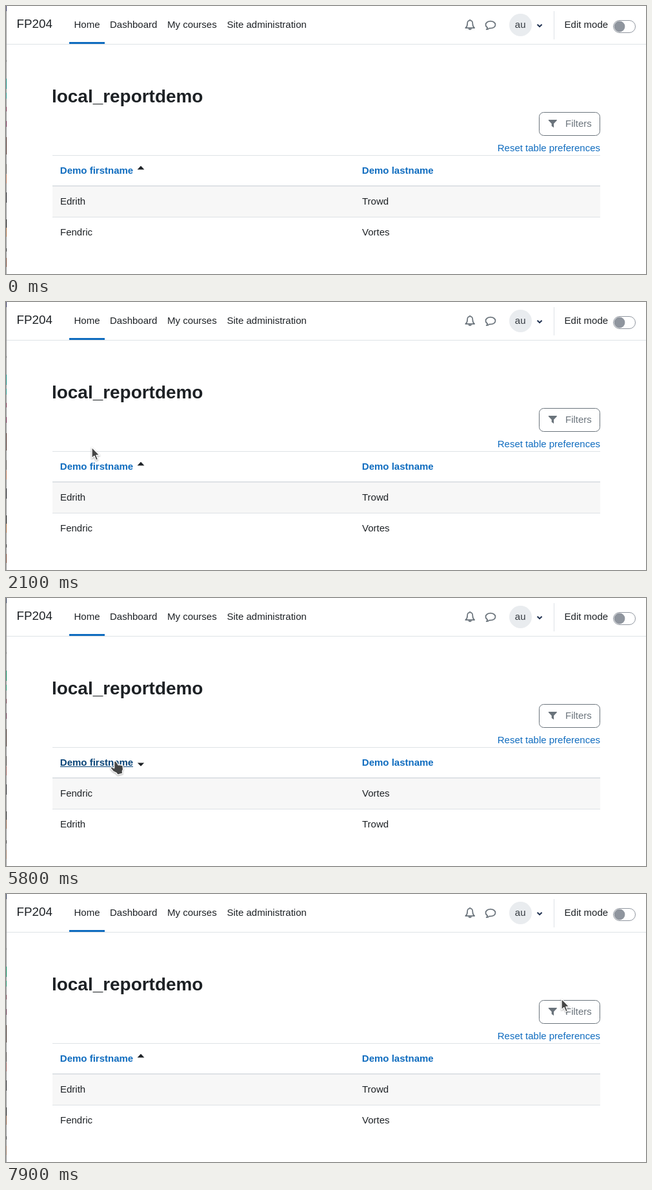
Recreate the animation shown at these times as an HTML page. Size 992 px wide and 417 px high, loop 8 s.

```html
<!DOCTYPE html>
<html lang="en">
<head>
<meta charset="utf-8">
<title>Report table</title>
<style>
  html, body { margin: 0; width: 100%; height: 100%; overflow: hidden; background: #fff; }
  svg { display: block; width: 992px; height: 417px; }
  text { font: 15px "Liberation Sans", Arial, sans-serif; fill: #1d2125; white-space: pre; }
  .brand { font-size: 18.75px; }
  .title { font-size: 27.95px; font-weight: 700; }
  .bold { font-weight: 700; }
  .link { fill: #0f6cbf; }
  .hover .link { fill: #094478; }
  .hover .rule { visibility: visible; }
  .rule { visibility: hidden; fill: #094478; }
  .muted { fill: #6a737b; }
  .line { fill: #dee2e6; }
  .icon { fill: none; stroke: #6a737b; stroke-width: 1.7; stroke-linejoin: round; }
  .pointer { fill: #454545; stroke: #fff; stroke-width: 1.3; stroke-linejoin: round;
    filter: drop-shadow(0 1px 1px rgba(0, 0, 0, .35)); }
</style>
</head>
<body>
<svg viewBox="0 0 992 417">
  <g id="edge"></g>

  <!-- navigation bar -->
  <text class="brand" x="16.6" y="34">FP204</text>
  <text x="105.5" y="34">Home</text>
  <text x="161" y="34">Dashboard</text>
  <text x="250" y="34">My courses</text>
  <text x="342.5" y="34">Site administration</text>
  <rect class="line" x="1" y="59" width="991" height="1"/>
  <rect x="98" y="56" width="55" height="3" fill="#0f6cbf"/>
  <path class="icon" d="M712.3 34.2c2-1.8 2.8-3.6 2.8-6.8 0-3 1.7-4.9 4.1-4.9s4.1 1.9 4.1 4.9c0 3.2.8 5 2.8 6.8zM719.2 22.3v-1.6M717.4 35c.3 2 3.3 2 3.6 0"/>
  <path class="icon" d="M751 23.7c-4.3 0-7.5 2.4-7.5 5.5 0 1.9 1.1 3.5 2.9 4.5-.2 1.2-.8 2-1.7 2.8 2 0 3.5-.8 4.6-2q.9.2 1.7.2c4.3 0 7.5-2.4 7.5-5.5s-3.2-5.5-7.5-5.5z"/>
  <circle cx="797.5" cy="29.5" r="17.5" fill="#e9ecef"/>
  <text x="797.2" y="34" text-anchor="middle" style="fill:#343a40">au</text>
  <path d="M823.6 28.7l3.5 3.4 3.5-3.4" fill="none" stroke="#1d2f4f" stroke-width="2"/>
  <rect class="line" x="849" y="8" width="1" height="44"/>
  <text x="865.6" y="34">Edit mode</text>
  <rect x="941.5" y="22.5" width="34" height="19" rx="9.5" fill="#fff" stroke="#8f959e"/>
  <circle cx="951" cy="32" r="8.4" fill="#8f959e"/>

  <!-- heading and controls -->
  <text class="title" x="71" y="150">local_reportdemo</text>
  <rect x="826.5" y="165.5" width="94" height="36" rx="7" fill="#fff" stroke="#6a737b"/>
  <path d="M841.2 177h12.3q.8.6.2 1.3l-4.6 4.8v6.1l-3.4-2.4v-3.7l-4.7-4.8q-.5-.8.2-1.3z" fill="#6a737b"/>
  <text class="muted" x="867" y="188">Filters</text>
  <text class="link" x="921" y="226" text-anchor="end">Reset table preferences</text>

  <!-- table -->
  <rect class="line" x="72" y="232" width="849" height="1"/>
  <rect class="line" x="72" y="279" width="849" height="2"/>
  <rect x="72" y="281" width="849" height="47" fill="#f7f7f7"/>
  <rect class="line" x="72" y="328" width="849" height="1"/>
  <g id="sort">
    <text class="link bold" x="83.8" y="261">Demo firstname</text>
    <rect class="rule" x="84" y="262" width="113" height="1"/>
  </g>
  <rect id="focus" x="83.5" y="245.5" width="113" height="20" fill="none" stroke="#094478" stroke-dasharray="1 1"/>
  <path id="caret" fill="#1d2125"/>
  <text class="link bold" x="551.8" y="261">Demo lastname</text>
  <g id="rows"></g>

  <path id="arrow" class="pointer" d="M0 0V17.2L3.9 13.6 6.7 20.2 9.6 19 6.9 12.5H12.2z"/>
  <path id="hand" class="pointer" d="M-1.8 .2c1-.8 2.3-.4 2.9.6L4.2 6c.8-.8 1.8-.8 2.5 0 .8-.6 1.9-.5 2.4.4 1-.4 1.8 0 2 1l.5 5.3-1.3 2.5.6 3.6-7.9 2.4-1.8-2.9-5.4-2.8-3.6-4.5c-.5-1.4.8-2.4 2.1-1.8l3.4 1.6L-2.3 2.4c-.5-.9-.2-1.7.5-2.2z"/>
</svg>
<script>
const LOOP = 8000, STEP = 100;
const NS = "http://www.w3.org/2000/svg";
const $ = id => document.getElementById(id);

const add = (parent, tag, attrs, text = "") => {
  const el = document.createElementNS(NS, tag);
  for (const key in attrs) el.setAttribute(key, attrs[key]);
  el.textContent = text;
  return parent.appendChild(el);
};

// Sliver of the window behind: [top, height, colour, colour after the click]
const SLIVER = [
  [0, 8, "#3a3a66", "#34405e"], [84, 3, "#777", "#808080"],
  [113, 16, "#1a8f86", "#0a8a5c"], [135, 9, "#36a69c", "#2d9f78"],
  [157, 7, "#7b3550", "#70404c"], [179, 9, "#70284c", "#63344c"],
  [204, 27, "#4a2c25", "#42302a"], [246, 15, "#66605c", "#55504c"],
  [262, 14, "#c48260", "#a06660"], [290, 16, "#1c1c20", "#28282c"],
  [332, 13, "#111", "#222"], [345, 14, "#ad7448", "#8f6248"],
  [377, 5, "#333", "#444"], [392, 14, "#7c4b38", "#a58470"]
];
add($("edge"), "rect", { width: 1, height: 417, fill: "#999" });
const slivers = SLIVER.map(([y, height]) => add($("edge"), "rect", { y, width: 1, height }));

const PEOPLE = [["Edrith", "Trowd"], ["Fendric", "Vortes"]];
const cells = [309, 357].map(y => [84, 552].map(x => add($("rows"), "text", { x, y })));

const CARET = { up: "M203.6 254.6L209 248.8 214.4 254.6z", down: "M203.8 256.4H214.2L209 261.8z" };

// Pointer path: [time, x, y]
const PATH = [
  [700, 40, 2], [1000, 52, 62], [1300, 71, 138], [1500, 95, 192], [1800, 95, 192],
  [2300, 158, 249], [2400, 165, 255], [2600, 165, 255], [2700, 170, 254],
  [7000, 170, 254], [7200, 450, 111], [7400, 450, 111], [7500, 600, 99],
  [7600, 772, 153], [7700, 772, 153], [7900, 861, 163]
];

const within = (t, from, to) => t >= from && t < to;
const show = (el, on) => el.setAttribute("visibility", on ? "visible" : "hidden");

function pointerAt(t) {
  const i = PATH.findIndex(p => p[0] >= t);
  if (i < 1) return PATH[0].slice(1);
  const [t0, x0, y0] = PATH[i - 1], [t1, x1, y1] = PATH[i];
  const k = (t - t0) / (t1 - t0);
  return [x0 + (x1 - x0) * k, y0 + (y1 - y0) * k];
}

function draw(t) {
  const hover = within(t, 2300, 7100);
  const reversed = within(t, 3800, 6000);
  const place = `translate(${pointerAt(t).map(Math.round)})`;

  $("sort").classList.toggle("hover", hover);
  show($("focus"), within(t, 3600, 3800) || within(t, 5900, 6000));
  $("caret").setAttribute("d", reversed ? CARET.down : CARET.up);
  cells.forEach((row, r) => row.forEach((cell, c) => {
    cell.textContent = PEOPLE[reversed ? 1 - r : r][c];
  }));
  slivers.forEach((el, i) => el.setAttribute("fill", SLIVER[i][t < 3600 ? 2 : 3]));

  $("arrow").setAttribute("transform", place);
  $("hand").setAttribute("transform", place);
  show($("arrow"), t >= 700 && !hover);
  show($("hand"), hover);
}

function tick() {
  const t = performance.now() % LOOP;
  draw(Math.floor(t / STEP) * STEP);
  requestAnimationFrame(tick);
}
tick();
</script>
</body>
</html>
```
